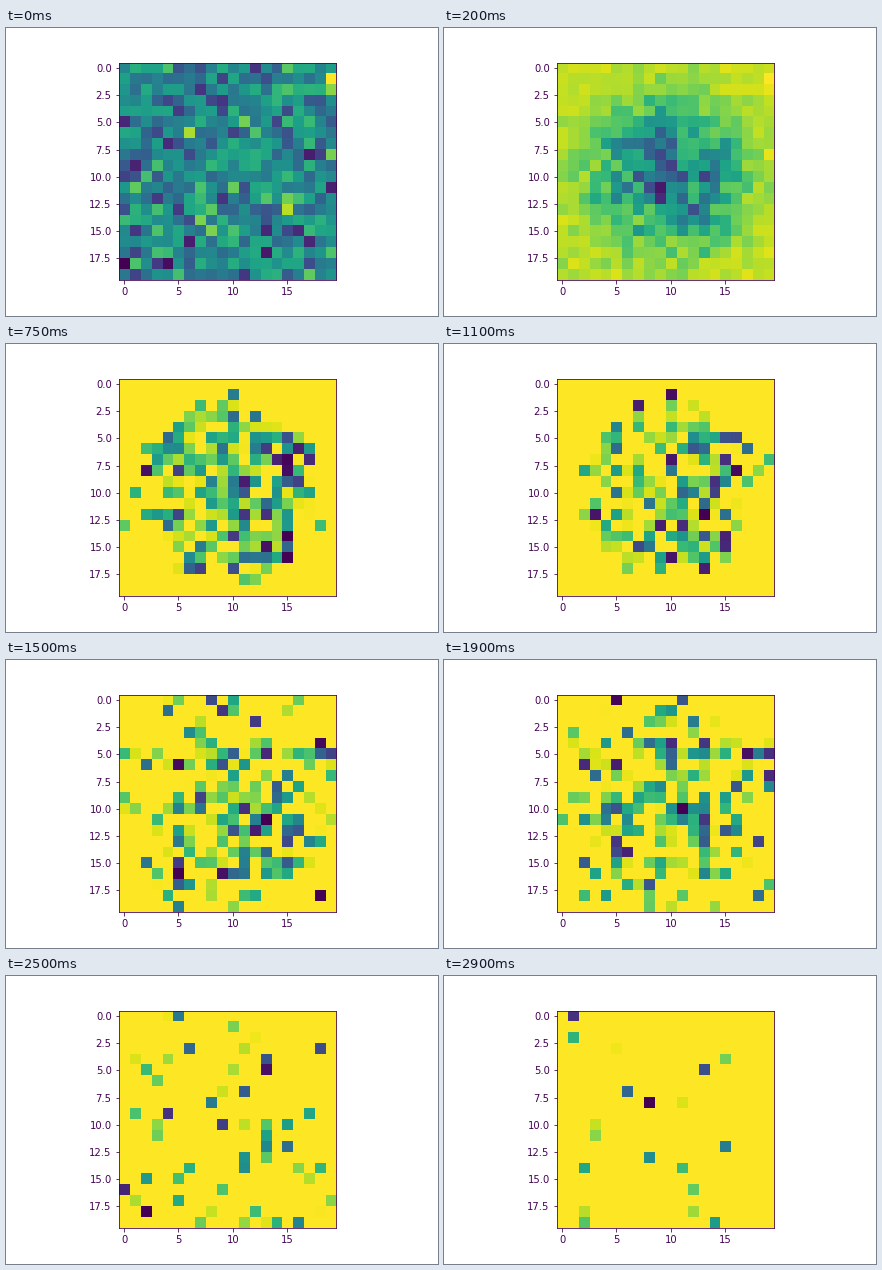
These frames come from a looping animation (432 px wide and 288 px high, 2.95 s). A matplotlib script:

```python
import numpy as np
import matplotlib.pyplot as plt
from matplotlib.animation import FuncAnimation

N = 20
FRAMES = 59
INTERVAL = 50
INK = "#440154"

rng = np.random.default_rng(12)
rows, cols = np.mgrid[:N, :N]
radius = np.hypot(rows - 9.9, cols - 9.8)


def ease(k, start, end):
    """Smooth step from 0 to 1 between two frames."""
    s = np.clip((k - start) / (end - start), 0, 1)
    return s * s * (3 - 2 * s)


def first_noise():
    grid = np.clip(rng.normal(.46, .16, (N, N)), 0, .9)
    grid[1, -1] = 1
    return grid


def drifting_noise(keep=.92):
    """Yield slowly changing fields whose values are spread evenly over 0..1."""
    z = rng.normal(size=N * N)
    while True:
        rank = z.argsort().argsort()
        yield ((rank + .5) / (N * N)).reshape(N, N)
        z = keep * z + np.sqrt(1 - keep ** 2) * rng.normal(size=N * N)


def blob(u):
    bell = np.exp(-radius ** 2 / (2 * 4.5 ** 2))
    return np.clip(bell * (.3 + .7 * u) - .04, 0, 1)


def patches(u, k):
    """Scattered cells that first fill a disc, then spread out and thin."""
    spread, thin = ease(k, 22, 30), ease(k, 38, 54)
    share = (1 - .4 * ease(k, 8, 24)) * (1 - .92 * thin)
    reach = 7.9 + .8 * spread + 9 * thin
    rim = .4 + 1.1 * spread
    chance = share / (1 + np.exp((radius - reach) / rim))
    q = np.clip((u - 1 + chance) / chance, 0, 1)
    return q * (.55 + .45 * q ** 4)


def build():
    start = first_noise()
    grids = []
    for k, u in zip(range(FRAMES), drifting_noise()):
        mix = ease(k, 8, 12)
        depth = (1 - mix) * blob(u) + mix * patches(u, k)
        level = 1 - depth / depth.max()
        settle = ease(k, -4, 7) if k else 0
        grids.append((1 - settle) * start + settle * level)
    return grids


grids = build()

plt.rcParams.update({
    "font.family": "DejaVu Sans", "font.size": 10, "text.color": INK,
    "axes.edgecolor": INK, "xtick.color": INK, "ytick.color": INK,
})
fig, ax = plt.subplots(figsize=(6, 4), dpi=72, facecolor="white")
fig.subplots_adjust(left=.125, right=.9, bottom=.125, top=.88)
image = ax.imshow(grids[0], cmap="viridis", vmin=0, vmax=1,
                  interpolation="nearest")
ax.set_xticks(range(0, N, 5))
ax.set_yticks(np.arange(0, N, 2.5))
ax.yaxis.set_major_formatter("{x:.1f}")


def update(k):
    image.set_data(grids[k])
    return [image]


anim = FuncAnimation(fig, update, frames=FRAMES, interval=INTERVAL,
                     repeat=True, repeat_delay=0)
plt.show()
```
